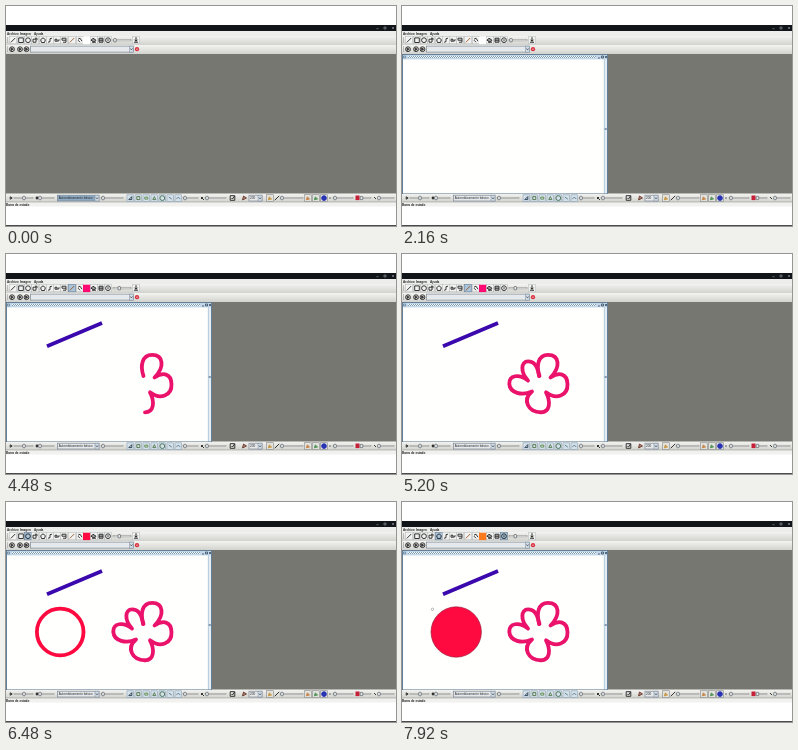
Recreate the animation shown at these times as an HTML page. Size 390x220 px, loop 8000 ms.

```html
<!DOCTYPE html>
<html lang="es">
<head>
<meta charset="utf-8">
<style>
html, body { margin: 0; width: 100%; height: 100%; overflow: hidden; background: #fff }
svg { display: block; width: 390px; height: 220px }
text { font-family: "Liberation Sans", Arial, sans-serif; font-size: 3.1px; fill: #222 }
</style>
</head>
<body>
<svg id="stage" viewBox="0 0 390 220">
  <linearGradient id="bar" x2="0" y2="1">
    <stop stop-color="#f3f3f1"/><stop offset="1" stop-color="#d2d2ce"/>
  </linearGradient>
  <pattern id="bumps" width="2" height="2" patternUnits="userSpaceOnUse">
    <path d="M0 0h1v1h-1zM1 1h1v1h-1z" fill="#f2f7fb"/>
  </pattern>
</svg>
<script>
const stage = document.getElementById('stage');

function add(tag, attrs, parent = stage) {
  const el = document.createElementNS('http://www.w3.org/2000/svg', tag);
  for (const k in attrs) el.setAttribute(k, attrs[k]);
  parent.appendChild(el);
  return el;
}
const rect = (x, y, width, height, fill, more, parent) =>
  add('rect', { x, y, width, height, fill, ...more }, parent);
const path = (d, stroke = '#333', width = .8, more, parent) =>
  add('path', { d, stroke, 'stroke-width': width, fill: 'none', ...more }, parent);
const dot = (cx, cy, r, fill, more, parent) =>
  add('circle', { cx, cy, r, fill, ...more }, parent);
function label(x, y, str, look) {
  add('text', { x, y, ...look }).textContent = str;
}
const show = (el, on) => el.setAttribute('visibility', on ? 'visible' : 'hidden');
const ramp = (t, a, b) => Math.min(1, Math.max(0, (t - a) / (b - a)));

function slider(x1, x2, y, thumb) {
  rect(x1, y - .7, x2 - x1, 1.4, '#f4f4f2', { stroke: '#888', 'stroke-width': .5 });
  return rect(thumb - 1.3, y - 1.7, 2.6, 3.4, '#e3ebf2', { rx: .8, stroke: '#444', 'stroke-width': .6 });
}
function combo(x, y, w, h) {
  const box = rect(x, y, w, h, '#e6e9eb', { stroke: '#7c8894', 'stroke-width': .7 });
  rect(x + w - 4, y, 4, h, '#d0dde8', { stroke: '#7c8894', 'stroke-width': .5 });
  path(`M${x + w - 3} ${y + h / 2 - .6}l1 1.4l1-1.4`, '#333', .7);
  return box;
}
// icon drawn around a centre; shape is relative to it
function icon(x, y, shape, color = '#222', fill = 'none') {
  path(shape, color, .9, { transform: `translate(${x} ${y})`, fill });
}
const BOX = 'M-2.3-2.3h4.6v4.6h-4.6z', RING = 'M-2.4 0a2.4 2.4 0 1 0 4.8 0a2.4 2.4 0 1 0-4.8 0';
const PEN = 'M-2.2 2.2l4.4-4.4', PLAY = 'M-.8-1.2l2 1.2l-2 1.2z';
const BOLD = { 'font-weight': 'bold', 'font-size': 3 };

// application frame
rect(0, 19, 390, 6, '#111519');
path('M370.5 22.7h2M378 21h2v2h-2zM386 21l2 2m0-2l-2 2', '#99a0a5', .6);
rect(0, 25, 390, 5, '#ededeb');
rect(0, 30, 390, 9, 'url(#bar)');
rect(0, 39, 390, 9, 'url(#bar)');
rect(0, 48, 390, 140, '#767771');
rect(0, 187.5, 390, 8.5, 'url(#bar)');
rect(0, 196, 390, 4.5, '#f1f1ef');
rect(0, 195.7, 390, .6, '#999');
rect(0, 219, 390, 1, '#4a4a4a');
label(1, 29.2, 'Archivo', BOLD);
label(14, 29.2, 'Imagen', BOLD);
label(28, 29.2, 'Ayuda', BOLD);
label(0, 200, 'Barra de estado', { ...BOLD, 'font-size': 3.2 });

// main tools
const marks = {};
for (const x of [7, 15, 22, 29, 37, 44, 51, 58, 66, 74, 88, 95, 102, 130]) {
  rect(x - 3.4, 30.6, 6.8, 7.2, '#f2f2f0', { stroke: '#b4b9be', 'stroke-width': .5 });
  marks[x] = rect(x - 3.4, 30.6, 6.8, 7.2, '#a9c4da', { stroke: '#68829a', 'stroke-width': .6 });
}
icon(7, 34.2, PEN);
icon(15, 34.2, BOX);
icon(22, 34.2, RING);
icon(29, 34.2, 'M-2-1h3v3h-3zM0-2h2v2');
icon(37, 34.2, 'M0-2.4L2.4-.5L1.5 2.3h-3L-2.4-.5z');
icon(44, 34.2, 'M-2 2q3 0 2-2t2-2');
icon(51, 34.2, 'M-2-1h2v2h-2zM0 1q3 0 2-2');
icon(58, 34.2, 'M-2-2h4v2h-4zM-1 2h3v-2');
icon(66, 34.2, PEN, '#9b5825');
icon(74, 34.2, 'M-2-1l2-1l2 3M-2 0l2 2');
icon(88, 34.2, 'M-1-2l3 2l-2 2l-3-2zM-2 2h4', '#222', '#999');
icon(95, 34.2, 'M-2-2h4v4h-4zM-2 0h4', '#222', '#bbb');
icon(102, 34.2, RING + 'M0-1v2');
icon(130, 34.2, 'M0-3v4m-1.5-1.5l1.5 1.5l1.5-1.5M-2 2h4', '#111');
path('M1.5 31v6M1.5 40v6', '#aaa', .7);
const swatch = rect(77, 30.7, 7.2, 7.4, '#fff');
const widthThumb = slider(107, 125, 34.2, 109);

// second row
for (const x of [6, 14, 20.5]) {
  icon(x, 43.2, RING);
  icon(x, 43.2, PLAY, '#333', '#333');
}
combo(24.5, 40.1, 103, 6);
dot(131, 43.2, 2.1, '#d92c3a');
path('M130 43.2h2', '#fff', .6);

// bottom row
icon(5, 192, PLAY);
slider(8, 27, 192, 18);
dot(31, 192, 1.4, '#333');
slider(33, 48, 192, 34);
const filterBox = combo(51.5, 189.2, 41.5, 5.8);
label(52.8, 193.2, 'Automáticamente básico');
slider(95, 117, 192, 97);
['#24394b', '#4f7040', '#5d8a48', '#507548', '#436e4d', '#5b7688', '#5b7688'].forEach((color, i) => {
  rect(121 + i * 8, 188.8, 6.6, 6.6, '#d3e0ea', { stroke: '#8ea3b4', 'stroke-width': .6 });
  icon(124.3 + i * 8, 192.1, ['M-1.5 1.5l3-3v3z', 'M-1.5-1.5h3v3h-3z', 'M-1.5-1h3v2h-3z', 'M-1.5 1.5l1.5-3l1.5 3z', RING, 'M-1.5-1l3 2', 'M-2 1l2-2l2 2'][i], color);
});
slider(177, 192, 192, 179);
icon(196, 192, 'M-1-1l3 3M1-1l-2 2');
slider(199, 220, 192, 201);
icon(226.5, 192, BOX + 'M-1 0l1 1l2-3');
icon(238.5, 192, 'M-2 2l1-4l3 2z', '#6b3b32', '#a88475');
combo(243, 189.2, 13, 5.8);
label(244, 193.2, '200');
for (const [x, color] of [[264, '#c99a45'], [302, '#c7874a'], [310, '#54965c'], [318, '#2834b4']]) {
  rect(x - 3.4, 188.7, 6.8, 6.8, '#e2e2df', { stroke: '#888', 'stroke-width': .6 });
  icon(x, 192.1, x === 318 ? RING : 'M-1.6 1.8l.8-3l2.4 2z', color, color);
}
icon(271, 192, PEN);
slider(274, 297, 192, 276);
icon(324, 192, 'M-1 0h2', '#555');
slider(327, 347, 192, 329);
rect(349.5, 189.5, 4, 4.6, '#c52038');
slider(355, 365, 192, 355.5);
icon(369, 192, 'M-1-1l2 2');
slider(372, 388, 192, 373);

// drawing window
const win = add('g', {});
rect(.4, 48.4, 205.2, 139.2, '#c3d6e7', { stroke: '#56738e', 'stroke-width': .8 }, win);
rect(1, 49, 204, 4, '#c3d6e7', {}, win);
rect(6, 50, 188, 2, '#7f9db7', {}, win);
rect(6, 50, 188, 2, 'url(#bumps)', {}, win);
path('M1.5 50h2v2h-2z', '#50718e', .6, {}, win);
path('M196 52h2M199.5 50h2v2h-2zM203 50l2 2m0-2l-2 2', '#243c54', .7, {}, win);
rect(1, 53.4, 201, 134, '#fffffd', {}, win);
rect(202.3, 53.4, 2.7, 134, '#e4edf5', {}, win);
path('M202.3 53.4v134', '#8fabc4', .5, {}, win);
path('M202.7 123h2', '#405f7b', 1.2, {}, win);

const line = path('', '#3a08ad', 3.8, {}, win);
const brush = { pathLength: 100, 'stroke-linecap': 'round', 'stroke-linejoin': 'round' };
const PINK = '#ea126b', RED = '#ff0a40';
const petals = [
  path('M137.5 122C134 112 136 100.8 146 100.8C157.5 100.8 159 113 148.5 123.5C157 118 165 119 165.5 130C166 142 154 146 144 138.3C149 148 148 158.3 139 158.3', PINK, 3.8, brush, win),
  path('M139 158.3C126 158 120 146 130 137.5C120 142 108 139 107.3 130C107 121 117 119.5 126 126.5C118 118 119 107.3 126 107.3C133 107.3 136 114 137 122', PINK, 3.8, brush, win)
];
const disc = add('circle', {}, win);
const handle = dot(30.5, 107.3, 1.2, '#fff', { stroke: '#777', 'stroke-width': .5 }, win);

function draw(p, a, b, t) {
  const k = ramp(t, a, b);
  show(p, k > 0);
  p.setAttribute('stroke-dasharray', `${100 * k} 200`);
}
function render(t) {
  const opened = t >= 1600;
  win.setAttribute('display', opened ? 'inline' : 'none');
  filterBox.setAttribute('fill', opened ? '#e6e9eb' : '#8caac3');
  widthThumb.setAttribute('x', 107.7 + 4.3 * ramp(t, 2720, 2960));
  swatch.setAttribute('fill', t < 2640 ? '#fff' : t < 3840 ? '#3a08ad' : t < 5440 ? '#ff0a72' : t < 7600 ? RED : '#ff7a1c');

  const tool = t < 2960 ? 0 : t < 3920 ? 7 : t < 5520 ? 66 : t < 6560 ? 22 : t < 7760 ? 74 : 37;
  const filled = t >= 6800, smooth = t >= 7040;
  for (const x in marks) {
    show(marks[x], +x === tool || (x === '102' && smooth) || (x === '88' && filled && t < 7760));
  }

  const k = ramp(t, 3040, 3360);
  show(line, k > 0);
  line.setAttribute('d', `M41 92.2L${41 + 55 * k} ${92.2 - 23.2 * k}`);
  draw(petals[0], 4000, 4480, t);
  draw(petals[1], 4480, 4960, t);

  const c = ramp(t, 5840, 6400), r = 25.2 * c;
  show(disc, c > 0);
  const look = filled
    ? { r, fill: RED, stroke: '#8f1838', 'stroke-width': .6 }
    : { r: Math.max(0, r - 1.9), fill: 'none', stroke: RED, 'stroke-width': 3.8 };
  const at = { cx: 29 + r, cy: 104.8 + r, ...look };
  for (const a in at) disc.setAttribute(a, at[a]);
  show(handle, t >= 6560);
}
function tick(now) {
  render(Math.floor(now % 8000 / 80) * 80);
  requestAnimationFrame(tick);
}
render(0);
requestAnimationFrame(tick);
</script>
</body>
</html>
```
